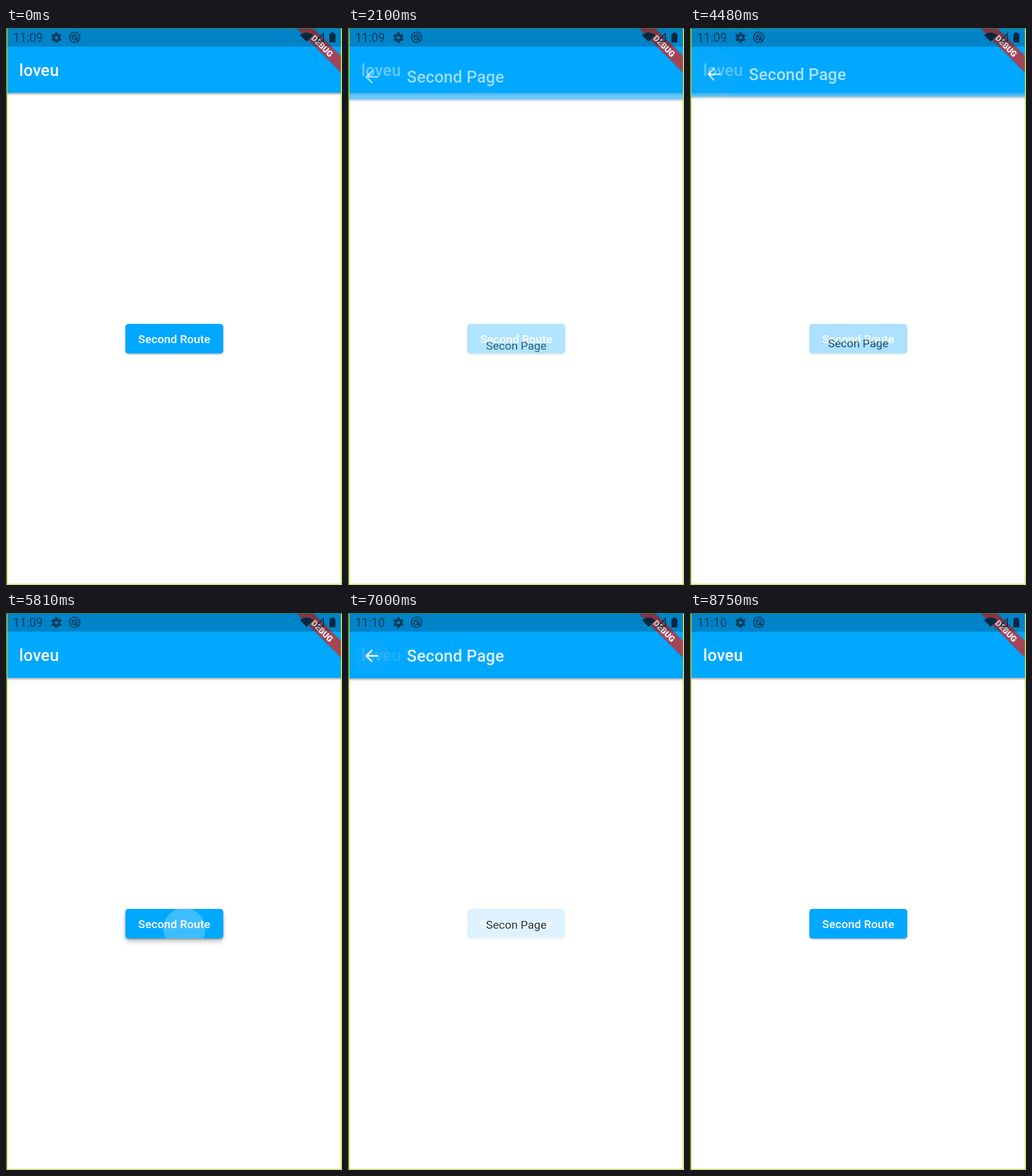
Recreate the animation shown at these times as an HTML page. Size 560 by 928 pixels, loop 8.82 s.

```html
<!DOCTYPE html>
<html lang="en">
<head>
<meta charset="utf-8">
<title>Route transition</title>
<style>
  html, body { margin: 0; width: 100%; height: 100%; overflow: hidden; background: #fff; }
  svg { display: block; width: 560px; height: 928px; font-family: Roboto, sans-serif; }
  .title { font-size: 27.3px; font-weight: 500; letter-spacing: .15px; fill: #fff; }
  .label { font-size: 19.1px; font-weight: 500; letter-spacing: .14px; fill: #fff; }
  .body { font-size: 19.1px; fill: #212121; }
  .banner { font-size: 13.9px; font-weight: 900; fill: #fff; }
</style>
</head>
<body>
<svg viewBox="0 0 560 928">
  <defs>
    <filter id="soft" x="-20%" y="-60%" width="140%" height="220%"><feGaussianBlur stdDeviation="1.6"/></filter>
    <filter id="wide" x="-20%" y="-60%" width="140%" height="220%"><feGaussianBlur stdDeviation="4.5"/></filter>
    <clipPath id="screen"><rect x="2" width="557" height="927"/></clipPath>
    <clipPath id="buttonShape"><rect x="199" y="493" width="163" height="49.5" rx="5"/></clipPath>
    <clipPath id="barShape"><rect x="2" y="-2" width="557" height="110"/></clipPath>
    <g id="bar">
      <rect x="-6" y="90" width="572" height="20.5" filter="url(#soft)" opacity=".3"/>
      <rect x="2" y="-2" width="557" height="110" fill="#00a8ff"/>
    </g>
  </defs>
  <rect width="560" height="928" fill="#fff"/>

  <g clip-path="url(#screen)">
    <!-- First page -->
    <use href="#bar"/>
    <text class="title" x="22" y="80">loveu</text>
    <rect id="lift" x="199" y="499" width="163" height="49" rx="6" filter="url(#wide)" opacity="0"/>
    <rect x="199" y="494.5" width="163" height="49" rx="5" filter="url(#soft)" opacity=".35"/>
    <g clip-path="url(#buttonShape)">
      <rect x="199" y="493" width="163" height="49.5" fill="#00a8ff"/>
      <circle id="buttonRipple" fill="#fff"/>
    </g>
    <text class="label" x="280.5" y="524.8" text-anchor="middle">Second Route</text>

    <!-- Second page -->
    <g id="second">
      <rect x="2" y="-2" width="557" height="930" fill="#fff"/>
      <use href="#bar"/>
      <g clip-path="url(#barShape)"><circle id="backRipple" fill="#c8c8c8"/></g>
      <path transform="translate(23.1 54.2) scale(1.364)" fill="#fff"
        d="M20 11H7.83l5.59-5.59L12 4l-8 8 8 8 1.41-1.41L7.83 13H20z"/>
      <text class="title" x="98" y="80">Second Page</text>
      <text class="body" x="280.5" y="525" text-anchor="middle">Secon Page</text>
    </g>

    <!-- Debug banner -->
    <g transform="translate(559 -2) rotate(45)">
      <rect x="-70" y="35" width="140" height="19.4" filter="url(#soft)" opacity=".2"/>
      <rect x="-70" y="35" width="140" height="19.4" fill="#b0404f" fill-opacity=".92"/>
      <text class="banner" y="50.2" text-anchor="middle">DEBUG</text>
    </g>

    <!-- System status bar -->
    <rect width="560" height="31" opacity=".22"/>
    <g fill="#0a3d5c">
      <text id="clock" x="12" y="23" font-size="19.8">11:09</text>
      <g transform="translate(84 16)">
        <circle r="4.6" fill="none" stroke="#0a3d5c" stroke-width="4"/>
        <g id="teeth"></g>
      </g>
      <g transform="translate(114.5 15.5)" fill="none" stroke="#0a3d5c" stroke-width="1.9">
        <circle r="8.6"/><circle r="4.4"/><path d="M-3.2-3.2L6.5 6.5"/>
      </g>
    </g>
    <g fill="#06283e">
      <path d="M490 12Q501 3 512 12L501 23Z"/>
      <path d="M529 9V22H517Z" fill="none" stroke="#06283e" stroke-width="1.6"/>
      <path d="M539 9.5h2.5V7.5h5v2H549V24H539Z"/>
    </g>
  </g>

  <!-- Window edge -->
  <path d="M.5 0V928" stroke="#315a22"/>
  <path d="M1 .5H560" stroke="#278248"/>
  <path d="M1.8 1V926.8H558.8V1" fill="none" stroke="#a9d12e" stroke-width="1.3"/>
</svg>
<script>
const LOOP = 8820, STEP = 70, TRANSITION = 300, RISE = 232;
const visits = [
  { press: 1750, push: 1880, back: 4300, pop: 4416 },
  { press: 5680, push: 5822, back: 6860, pop: 6976 }
];
const $ = id => document.getElementById(id);
const clamp = v => Math.max(0, Math.min(1, v));
const mix = (a, b, k) => a + (b - a) * k;
const set = (id, attrs) => {
  for (const name in attrs) $(id).setAttribute(name, attrs[name]);
};

const bezier = (x1, y1, x2, y2) => x => {
  const axis = (a, b, s) => 3 * (1 - s) ** 2 * s * a + 3 * (1 - s) * s * s * b + s ** 3;
  let low = 0, high = 1;
  for (let i = 0; i < 24; i++) {
    const mid = (low + high) / 2;
    if (axis(x1, x2, mid) < x) low = mid; else high = mid;
  }
  return axis(y1, y2, low);
};
const fastOutSlowIn = bezier(.4, 0, .2, 1);
const easeIn = bezier(.42, 0, 1, 1);
const ease = bezier(.25, .1, .25, 1);

// Grows slowly while held, quickly after release, then fades out.
function ripple(id, t, down, up, { from, to, radius, strength }) {
  const held = Math.max(0, Math.min(t, up) - down);
  const released = Math.max(0, t - up);
  const k = ease(clamp(held / 1000 + released / 225));
  set(id, {
    cx: mix(from[0], to[0], k),
    cy: mix(from[1], to[1], k),
    r: mix(radius * .3, radius + 6.8, k),
    opacity: strength * clamp(held / 75) * (1 - clamp((released - 225) / 150))
  });
}

function draw(t) {
  const { press, push, back, pop } = t < 5000 ? visits[0] : visits[1];

  const shown = clamp((t - push) / TRANSITION) - clamp((t - pop) / TRANSITION);
  set('second', {
    transform: `translate(0 ${RISE * (1 - fastOutSlowIn(shown))})`,
    opacity: shown > 0 ? easeIn(shown) : 0
  });

  ripple('buttonRipple', t, press, push,
    { from: [300, 528], to: [280.5, 518], radius: 85, strength: .24 });
  ripple('backRipple', t, back, pop,
    { from: [39.5, 70.5], to: [39.5, 70.5], radius: 48, strength: .06 });
  set('lift', { opacity: .2 * (clamp((t - press) / 130) - clamp((t - push) / 200)) });

  $('clock').textContent = t < 6440 ? '11:09' : '11:10';
}

$('teeth').innerHTML = Array.from({ length: 6 }, (_, i) =>
  `<rect x="-2.2" y="-8.6" width="4.4" height="4" transform="rotate(${i * 60})"/>`).join('');

const start = performance.now();
function tick() {
  const t = (performance.now() - start) % LOOP;
  draw(Math.floor(t / STEP) * STEP);
  requestAnimationFrame(tick);
}
draw(0);
requestAnimationFrame(tick);
</script>
</body>
</html>
```
